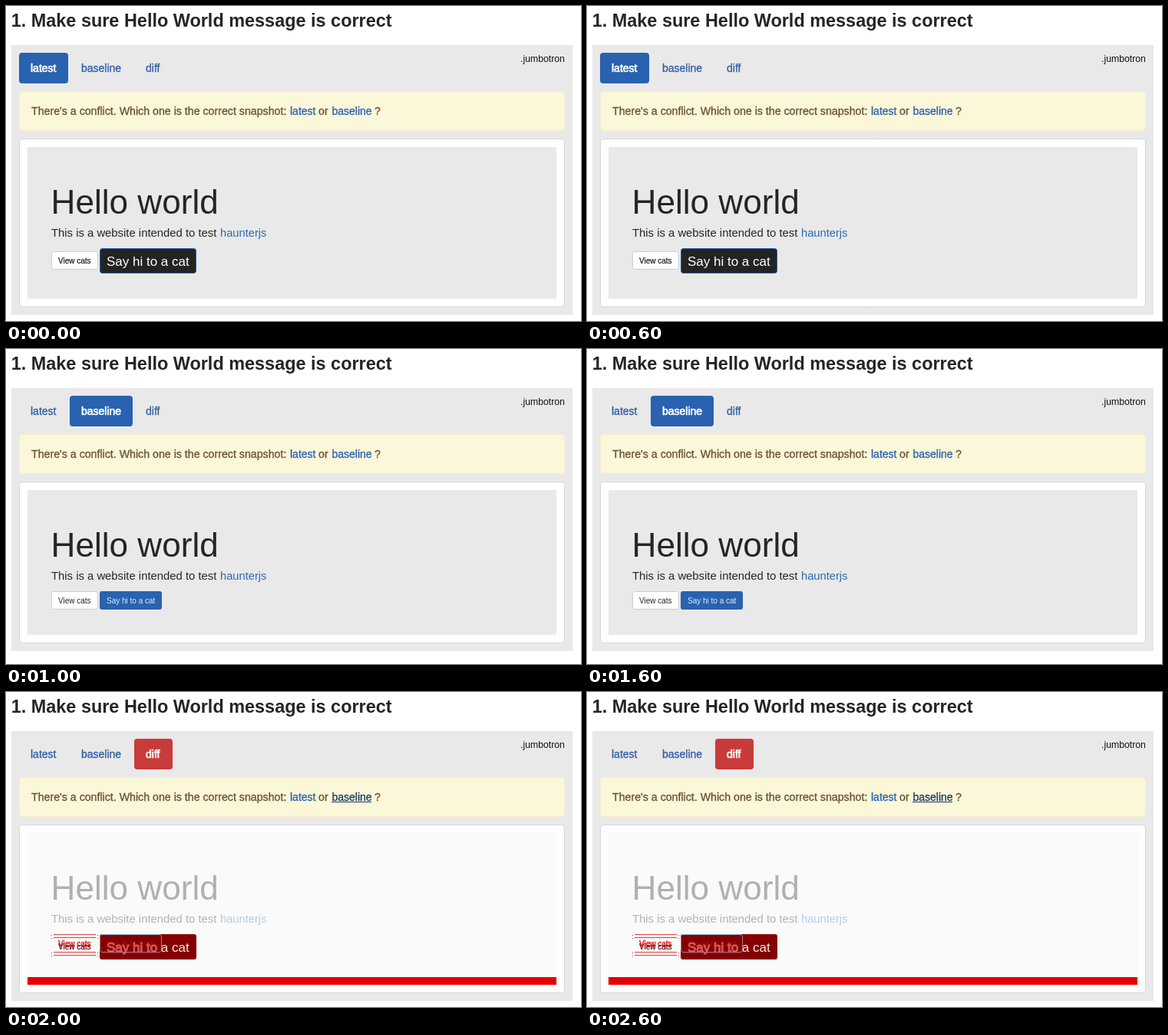
An HTML page with a canvas for the animation above (3000 ms loop, 749 by 411 pixels).

```html
<!DOCTYPE html>
<html lang="en">
<head>
<meta charset="utf-8">
<title>Snapshot conflict</title>
<style>
html, body { margin: 0; width: 100%; height: 100%; overflow: hidden; background: #fff; }
canvas { display: block; }
</style>
</head>
<body>
<canvas id="stage" width="749" height="411"></canvas>
<script>
const ctx = document.getElementById('stage').getContext('2d');
const FONT = '"Liberation Sans", Arial, sans-serif';
const BLUE = '#2962b0', INK = '#252525', GREY = '#e9e9e9', RED = '#e60000';
const TABS = [
  { label: 'latest', x: 17, w: 64, active: BLUE },
  { label: 'baseline', x: 83, w: 82, active: BLUE },
  { label: 'diff', x: 167, w: 50, active: '#c93b3a' }
];

function rect(x, y, w, h, fill) {
  ctx.fillStyle = fill;
  ctx.fillRect(x, y, w, h);
}

function box(x, y, w, h, radius, fill, border) {
  const inset = border ? 0.5 : 0;
  ctx.beginPath();
  ctx.roundRect(x + inset, y + inset, w - 2 * inset, h - 2 * inset, radius);
  if (fill) {
    ctx.fillStyle = fill;
    ctx.fill();
  }
  if (border) {
    ctx.strokeStyle = border;
    ctx.lineWidth = 1;
    ctx.stroke();
  }
}

// weight adds a hairline outline for medium-weight lettering
function text(str, x, y, size, color, weight = 0, style = '') {
  ctx.font = `${style} ${size}px ${FONT}`;
  ctx.fillStyle = color;
  ctx.fillText(str, x, y);
  if (weight) {
    ctx.strokeStyle = color;
    ctx.lineWidth = weight;
    ctx.strokeText(str, x, y);
  }
}

function outlineText(str, x, y, size, color) {
  ctx.font = `${size}px ${FONT}`;
  ctx.strokeStyle = color;
  ctx.lineWidth = 0.8;
  ctx.strokeText(str, x, y);
}

function drawTabs(active) {
  TABS.forEach(({ label, x, w, active: fill }, i) => {
    const on = i === active;
    if (on) box(x, 61, w, 40, 4, fill);
    text(label, x + 15, 86, 14, on ? '#fff' : '#2f5ca3', on ? 0.7 : 0.3);
  });
}

function drawAlert(hover) {
  box(17, 111, 711, 52, 4, '#fbf7d9', '#faebcc');
  text("There's a conflict. Which one is the correct snapshot:", 33, 142, 14.2, '#6b5130', 0.3);
  text('latest', 370, 142, 14, BLUE, 0.3);
  text('or', 407, 142, 14.2, '#6b5130', 0.3);
  text('baseline', 424.5, 142, 14, hover ? '#1d3c68' : BLUE, 0.3);
  if (hover) rect(424, 143, 52, 1, '#1d3c68');
  text('?', 480, 142, 14.2, '#6b5130', 0.3);
}

function drawCopy(heading, body, link) {
  text('Hello world', 58.6, 271, 44.1, heading);
  text('This is a website intended to test', 59, 301, 14.85, body);
  text('haunterjs', 279, 301, 14.7, link);
}

function drawLatest() {
  drawCopy(INK, INK, '#2a69b4');
  box(59, 320, 61, 24, 3, '#fff', '#ccc');
  text('View cats', 68, 336, 10, INK, 0.25);
  box(122, 316, 126, 33, 3, '#232323', '#2660ad');
  text('Say hi to a cat', 131, 339, 17, '#fff');
}

function drawBaseline() {
  drawCopy(INK, INK, '#2a69b4');
  box(59, 316, 61, 24, 3, '#fff', '#ccc');
  text('View cats', 68, 332, 10, INK);
  box(122, 316, 81, 24, 3, BLUE);
  text('Say hi to a cat', 131, 332, 10, '#e3ecf6');
}

function drawDiff() {
  drawCopy('#b0b0b0', '#b3b3b3', '#b2cde9');

  for (const y of [316, 320, 339, 343]) {
    rect(62, y, 55, 1, '#d94040');
    rect(59, y + 1, 1, 1, '#b33');
    rect(119, y + 1, 1, 1, '#b33');
  }
  text('View cats', 68, 332, 10, RED, 0.3);
  text('View cats', 68, 336, 10, '#5a0808', 0.2);

  box(122, 316, 126, 33, 3, '#840000');
  text('Say hi to a cat', 131, 339, 17, '#f6e6e6');
  ctx.save();
  ctx.beginPath();
  ctx.rect(123, 317, 79, 31);
  ctx.clip();
  rect(123, 317, 79, 31, '#840000');
  text('Say hi to a cat', 131, 339, 17, '#d93b3b');
  text('Say hi to a cat', 131, 332, 10, '#a51616');
  outlineText('Say hi to a cat', 131, 339, 17, '#e16a6a');
  ctx.restore();
  box(122, 316, 81, 24, 3, null, '#a08293');
  rect(124, 316, 77, 1, '#83a9d3');

  rect(28, 372, 689, 10, RED);
}

const VIEWS = [drawLatest, drawBaseline, drawDiff];

function draw(view) {
  const isDiff = view === 2;
  const shorter = view === 1 ? 9 : 0;
  rect(0, 0, 749, 411, '#fff');
  text('1. Make sure Hello World message is correct', 6.7, 27, 23.45, INK, 0, 'bold');
  rect(7, 51, 731, 352 - shorter, GREY);
  drawTabs(view);
  text('.jumbotron', 670, 73, 12.25, '#111');
  drawAlert(isDiff);
  box(17, 173, 711, 220 - shorter, 4, isDiff ? '#fdfdfd' : '#fff', '#d6d6d6');
  rect(28, 184, 689, 198 - shorter, isDiff ? '#fafafa' : GREY);
  VIEWS[view]();
}

const start = performance.now();
function tick() {
  const time = (performance.now() - start) % 3000;
  draw(Math.floor(time / 1000));
  requestAnimationFrame(tick);
}
tick();
</script>
</body>
</html>
```
